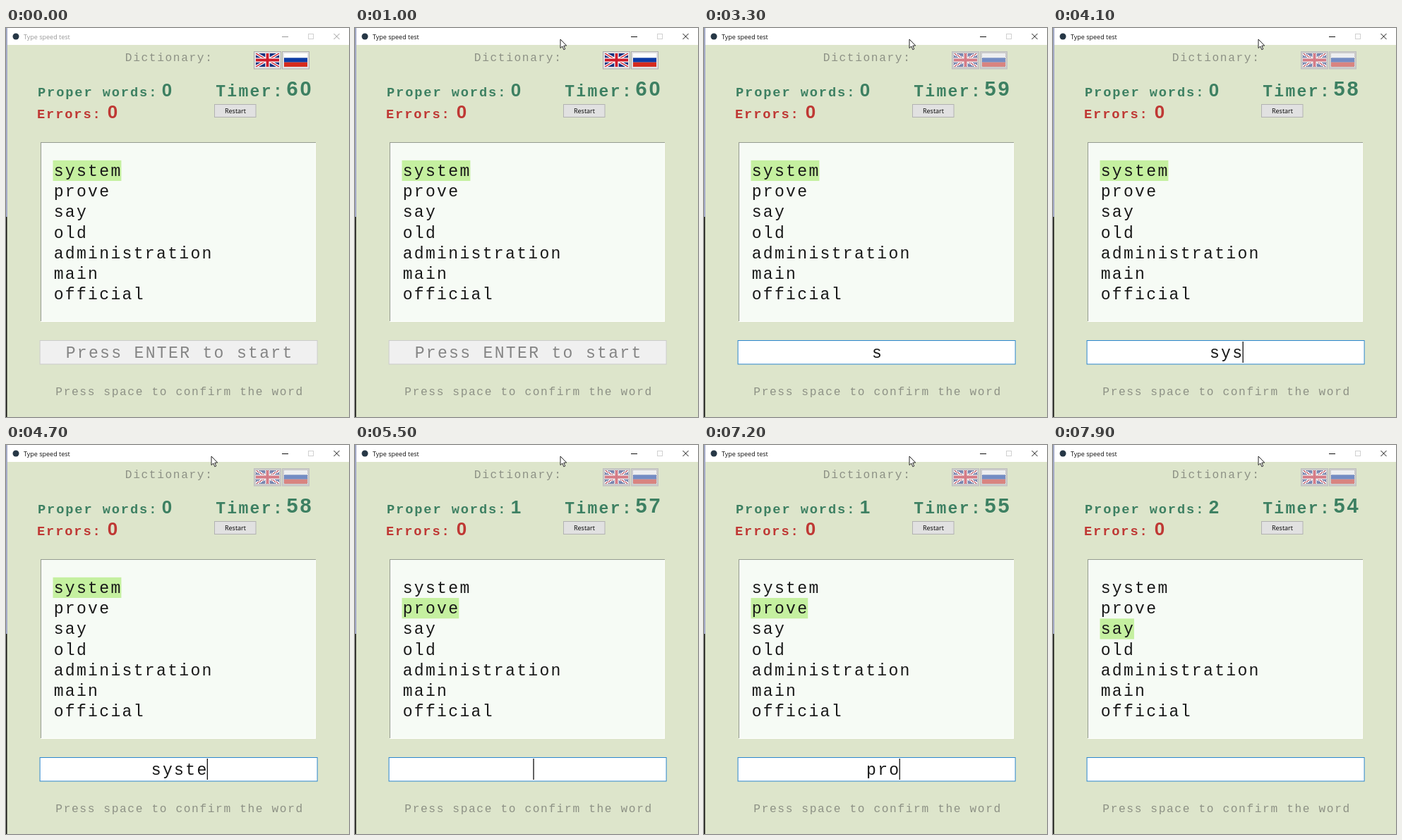
Animation, 486 px wide and 552 px high, one loop 8 s. Source, as an HTML page with a canvas:

```html
<!DOCTYPE html>
<html lang="en">
<head>
<meta charset="utf-8">
<title>Type speed test</title>
<style>
html, body { margin: 0; width: 486px; height: 552px; overflow: hidden; }
canvas { display: block; }
</style>
</head>
<body>
<canvas id="stage" width="486" height="552"></canvas>
<script>
const ctx = document.getElementById('stage').getContext('2d');
const LOOP = 8000, ACTIVATE = 1000, START = 1800;
const MONO = '"Liberation Mono", monospace';
const DIGITS = '"Liberation Sans", sans-serif';
const SANS = '"Open Sans", sans-serif';
const GREEN = '#3d8062', RED = '#bf3834', GREY = '#8d9185', INK = '#181818';
const CELL = 16.15, SMALL_CELL = 11.34, LABEL_CELL = 13.1, TIMER_CELL = 19;
const WORDS = ['system', 'prove', 'say', 'old', 'administration', 'main', 'official'];

// Keystroke times; a space confirms the word and stays in the field.
const KEYS = [
  [3000, 's'], [4000, 'y'], [4100, 's'], [4500, 't'], [4700, 'e'], [5000, 'm'], [5300, ' '],
  [6800, 'p'], [6900, 'r'], [7000, 'o'], [7500, 'v'], [7700, 'e'], [7900, ' ']
];

function rect(x, y, w, h, color) {
  ctx.fillStyle = color;
  ctx.fillRect(x, y, w, h);
}

function box(x, y, w, h, fill, border) {
  rect(x, y, w, h, border);
  rect(x + 1, y + 1, w - 2, h - 2, fill);
}

function text(str, x, y, font, color) {
  ctx.font = font;
  ctx.fillStyle = color;
  ctx.fillText(str, x, y);
}

// Typewriter setting: compact letters, widely spaced, one per cell.
function typed(str, x, y, cell, color, font = `${cell * 1.43}px ${MONO}`) {
  ctx.font = font;
  const gap = cell - ctx.measureText('0').width;
  ctx.letterSpacing = `${gap}px`;
  text(str, x + gap / 2, y, font, color);
  ctx.letterSpacing = '0px';
}

const label = (str, x, y, cell, color) =>
  typed(str, x, y, cell, color, `bold ${cell * 1.43}px ${MONO}`);

const number = (n, x, y, cell, size, color) =>
  typed(String(n), x, y, cell, color, `bold ${size}px ${DIGITS}`);

function line(color, width, ...points) {
  ctx.strokeStyle = color;
  ctx.lineWidth = width;
  ctx.beginPath();
  for (let i = 0; i < points.length; i += 4) {
    ctx.moveTo(points[i], points[i + 1]);
    ctx.lineTo(points[i + 2], points[i + 3]);
  }
  ctx.stroke();
}

function typing(t) {
  let entry = '', done = 0;
  for (const [time, key] of KEYS) {
    if (t < time) break;
    if (key === ' ') {
      entry = ' ';
      done++;
    } else entry += key;
  }
  return { entry, done };
}

function titleBar(active) {
  rect(2, 0, 484, 24, '#fff');
  ctx.fillStyle = '#263746';
  ctx.beginPath();
  ctx.arc(14, 12, 4.5, 0, Math.PI * 2);
  ctx.fill();
  const ink = active ? '#111' : '#999';
  text('Type speed test', 25, 16, `9px ${SANS}`, ink);
  line(ink, 1, 391, 12.5, 400, 12.5);
  line(ink, 1, 464.5, 8, 472.5, 16, 472.5, 8, 464.5, 16);
  ctx.strokeStyle = '#d0d0d0';
  ctx.strokeRect(428.5, 8.5, 7, 7);
}

function unionFlag(x, y, w, h) {
  ctx.save();
  ctx.beginPath();
  ctx.rect(x, y, w, h);
  ctx.clip();
  rect(x, y, w, h, '#17307f');
  const cx = x + w / 2, cy = y + h / 2;
  const diagonals = [x, y, x + w, y + h, x + w, y, x, y + h];
  const cross = [cx, y, cx, y + h, x, cy, x + w, cy];
  line('#fff', 4, ...diagonals);
  line('#cf1b2b', 1.4, ...diagonals);
  line('#fff', 6.4, ...cross);
  line('#cf1b2b', 3.8, ...cross);
  ctx.restore();
}

function tricolor(x, y, w, h) {
  ['#fff', '#0c3ca6', '#d52b1e'].forEach((c, i) => rect(x, y + i * h / 3, w, h / 3, c));
}

function flagButton(x, drawFlag, disabled) {
  box(x, 33, 39, 25.5, disabled ? '#ccc' : '#e1e1e1', disabled ? '#bfbfbf' : '#adadad');
  drawFlag(x + 3, 36, 33, 19);
  if (!disabled) return;
  for (let j = 0; j < 19; j++)
    for (let i = j % 2; i < 33; i += 2)
      rect(x + 3 + i, 36 + j, 1, 1, '#dcdde2');
}

function header(done, seconds) {
  typed('Dictionary:', 168, 47, SMALL_CELL, GREY);
  label('Proper words:', 44, 97, LABEL_CELL, GREEN);
  number(done, 220, 97, CELL, 26, GREEN);
  label('Errors:', 43, 128, LABEL_CELL, RED);
  number(0, 143, 128, CELL, 26, RED);
  label('Timer:', 296, 96.5, CELL, GREEN);
  number(seconds, 396, 96, TIMER_CELL, 29, GREEN);
  box(295, 108, 59.5, 19, '#e1e1e1', '#b2b2b2');
  text('Restart', 310, 121, `9px ${SANS}`, '#000');
}

function wordPanel(current) {
  rect(49, 162, 390, 255, '#fff');
  rect(49, 162, 390, 1, '#959b90');
  rect(49, 162, 1, 254, '#959b90');
  rect(50, 163, 388, 253, '#f6fbf5');
  WORDS.forEach((word, i) => {
    const y = 187.8 + i * 29.25;
    if (i === current) rect(66.5, y, word.length * CELL, 29.2, '#c5f0a0');
    typed(word, 66.5, Math.round(y + 22), CELL, INK);
  });
}

function entryField(t, entry) {
  const running = t >= START;
  box(47.6, 443, 394, 34.5, running ? '#fff' : '#f0f0f0', running ? '#2b86ce' : '#ccc');
  const str = running ? entry : 'Press ENTER to start';
  const half = str.length * CELL / 2;
  typed(str, 245 - half, 468, CELL, running ? INK : '#858585');
  if (running && (t - START) % 900 < 600) rect(244.3 + half, 445, 1.3, 30, '#111');
}

function pointer(t) {
  if (t < 100) return;
  // A single sweep up to the title bar.
  const p = Math.min(1, (Math.floor(t / 100) - 1) / 8), q = 1 - p;
  const curve = (a, b, c, d) => q * q * q * a + 3 * q * q * p * b + 3 * q * p * p * c + p * p * p * d;
  ctx.save();
  ctx.translate(curve(82, 290, 560, 290.5), curve(447, 380, 100, 15.5));
  ctx.beginPath();
  [[.5, .5], [.5, 13], [3.3, 10.4], [5.3, 15.2], [7.3, 14.3], [5.3, 9.7], [9.2, 9.5]]
    .forEach(([x, y]) => ctx.lineTo(x, y));
  ctx.closePath();
  ctx.fillStyle = '#fff';
  ctx.fill();
  ctx.strokeStyle = '#222';
  ctx.lineWidth = 1;
  ctx.stroke();
  ctx.restore();
}

function draw(t) {
  const { entry, done } = typing(t);
  const seconds = 60 - Math.max(0, Math.floor((t - START) / 1000));
  rect(0, 0, 486, 552, '#dde5cb');
  rect(0, 0, 2, 268, '#a4abc6');
  rect(0, 268, 1.5, 284, '#10100f');
  titleBar(t >= ACTIVATE);
  flagButton(351, unionFlag, t >= START);
  flagButton(391, tricolor, t >= START);
  header(done, seconds);
  wordPanel(done);
  entryField(t, entry);
  typed('Press space to confirm the word', 69.5, 520.5, SMALL_CELL, GREY);
  pointer(t);
}

let origin;
function tick(now) {
  origin ??= now;
  draw((now - origin) % LOOP);
  requestAnimationFrame(tick);
}
draw(0);
requestAnimationFrame(tick);
</script>
</body>
</html>
```
